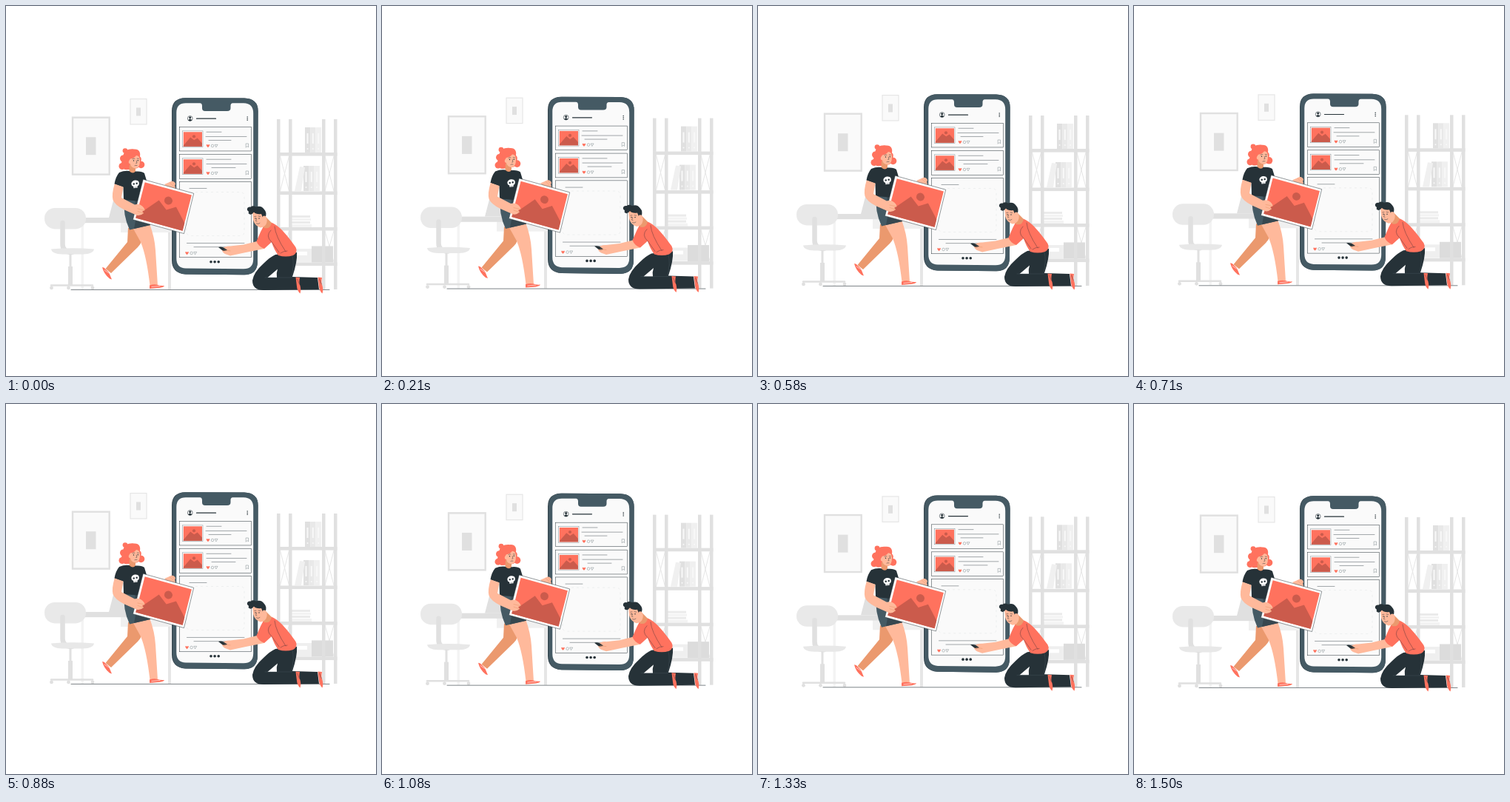
Animation, 500 px wide and 500 px high, one loop 1.54 s. Source, as an HTML page:

```html
<!DOCTYPE html>
<html lang="en">
<head>
<meta charset="utf-8">
<title>Posting a picture</title>
<style>
html, body { margin: 0; width: 100%; height: 100%; overflow: hidden; background: #fff; }
svg { display: block; width: 100vw; height: 100vh; }
</style>
</head>
<body>
<svg viewBox="0 0 500 500">
  <defs>
    <g id="photo">
      <rect width="1" height="1" fill="#ff725e"/>
      <path d="M0 .94L.374 .37L.57 .57L.75 .42L1 .78V1H0Z" fill="#cb5b4c"/>
      <ellipse cx=".564" cy=".312" rx=".084" ry=".108" fill="#cb5b4c"/>
    </g>
  </defs>
  <g id="scene"></g>
</svg>
<script>
const INK = '#263238', SLATE = '#455a64', CORAL = '#ff725e', SKIN = '#ffb99b', SHADE = '#eb996e';
const GREY = '#e0e0e0', PALE = '#ebebeb', FAINT = '#f3f3f3', SOFT = '#7d888d';

const path = (d, fill, extra = '') => `<path d="${d}" fill="${fill}" ${extra}/>`;
const line = (d, color = INK, w = 0.5) =>
  `<path d="${d}" fill="none" stroke="${color}" stroke-width="${w}" stroke-linecap="round" stroke-linejoin="round"/>`;
const rect = (x, y, w, h, fill, extra = '') =>
  `<rect x="${x}" y="${y}" width="${w}" height="${h}" fill="${fill}" ${extra}/>`;
const dot = (x, y, r, fill, extra = '') => `<circle cx="${x}" cy="${y}" r="${r}" fill="${fill}" ${extra}/>`;
const photo = m => `<use href="#photo" transform="matrix(${m})"/>`;
const outline = (color, w) => `stroke="${color}" stroke-width="${w}"`;

function wall() {
  return rect(90, 150.7, 49.7, 77, '#fafafa', outline(GREY, 2.4)) +
    rect(108, 177.3, 13.5, 24, GREY) +
    rect(168, 125.6, 22, 34.4, '#fafafa', outline('#e6e6e6', 1.2)) +
    rect(176, 137.5, 6, 11, GREY);
}

function desk() {
  return rect(101.5, 293, 3.5, 90, FAINT) + rect(219, 300, 4, 83, '#e6e6e6') +
    rect(155, 291, 67, 15, '#f0f0f0') + rect(105, 286, 118, 7.2, GREY) +
    path('M139 286L145 263Q145.500 261 148 261H171V286Z', GREY);
}

function chair() {
  return rect(52, 273, 56, 28.5, '#e9e9e9', 'rx="14"') +
    line('M76.500 293V322Q76.500 333 89 333', GREY, 6.5) +
    path('M61 328.500Q90 326 119 328.500Q118 335 104 335.500H76Q62 335 61 328.500Z', '#e8e8e8') +
    rect(85.5, 335, 3, 20, GREY) + rect(84, 352, 6, 25, GREY) +
    line('M61 377.500H117', GREY, 2.5) +
    [61.5, 84.5, 117].map(x => dot(x, 381, 2.4, GREY)).join('');
}

function books(x, y, h) {
  return [0, 1, 2].map(i =>
    rect(x + i * 7.3, y, 7.3, h, [GREY, '#e9e9e9', '#f0f0f0'][i]) +
    rect(x + i * 7.3 + 2.5, y + 8, 2, 14, '#f8f8f8') +
    dot(x + i * 7.3 + 3.5, y + h - 5, 1, '#f8f8f8')).join('');
}

function shelf() {
  const cross = (x, y, b) => line(`M${x} ${y}L${x + 12} ${b}M${x + 12} ${y}L${x} ${b}`, '#e6e6e6', 1);
  let s = '';
  for (const x of [370.5, 431]) s += cross(x, 203, 250) + cross(x, 304, 346);
  s += books(404, 164, 34) + books(402, 216, 34) +
    path('M390 250L397 217L404 218L399 250Z', '#f0f0f0');
  for (let i = 0; i < 3; i++) s += rect(383 + i % 2, 283 + i * 4, 28, 3, i === 1 ? FAINT : PALE);
  s += rect(383, 295, 30, 4, FAINT) + rect(387, 328, 27, 18, '#efefef') +
    rect(394, 332, 13, 5, '#fff') + rect(413, 324.5, 29, 22, '#dcdcdc');
  for (const x of [366, 382, 427, 443]) s += rect(x, 153, 4.5, 230, GREY);
  for (const y of [198, 250.5, 299, 346.5]) s += rect(366, y, 81.5, 4.6, GREY);
  return s;
}

function icons(x, y) {
  return path(`M${x} ${y + 2.2}C${x - 4} ${y - 1} ${x - 1.5} ${y - 3.2} ${x} ${y - 1}C${x + 1.5} ${y - 3.2} ${x + 4} ${y - 1} ${x} ${y + 2.2}Z`, CORAL) +
    dot(x + 6, y, 1.8, 'none', outline(SOFT, 0.5)) +
    line(`M${x + 9.5} ${y - 1.6}h3.600l-2 3.200z`, SOFT, 0.5);
}

function post(y, h, rows) {
  let s = rect(234.5, y, 97, h, 'none', outline(INK, 0.5)) +
    rect(238.6, y + 5.4, 27.4, 21.6, '#fff', outline(SOFT, 0.5)) +
    photo([25.2, 0, 0, 19.4, 239.8, y + 6.8]) +
    icons(273, y + 25.5) + line(`M324.500 ${y + 22.5}h3v5l-1.500 -1.500l-1.500 1.500z`, SOFT, 0.5);
  rows.forEach(([a, b], i) => s += line(`M${a} ${y + [6.8, 13, 18][i]}H${b}`, INK, 0.42));
  return s;
}

function phone() {
  const body = (x, fill) => path(`M${x + 18} 124.200L322 124.500Q340.600 125 340.600 142L340 345Q340 363 322 363.300L${x + 18} 362.500Q${x} 361 ${x} 343.500V142Q${x} 124.500 ${x + 18} 124.200Z`, fill);
  let s = body(224, '#37474f') + body(225, SLATE) +
    path('M243 131.200H262Q265 131.300 265 135V138Q265 142 269 142H299Q303.500 142 303.500 138V135Q303.500 131.400 306.500 131.400H321Q334.200 131.700 334.200 145V342Q334.200 355.300 321 355.300L243 354.600Q230.300 354 230.300 341V144Q230.300 131.300 243 131.200Z', '#fafafa');
  s += dot(248.7, 152, 3.4, '#fff', outline(INK, 0.6)) + dot(248.7, 150.8, 1.5, INK) +
    path('M246.200 154.500Q248.700 150.800 251.200 154.500Q248.700 156.500 246.200 154.500Z', INK) +
    line('M257.500 152.200H283.500', INK, 1.2);
  for (let i = 0; i < 3; i++) s += dot(326.2, 150 + i * 2.2, 0.75, INK) + dot(277 + i * 5.1, 345.8, 1.8, INK);
  s += post(163.5, 32.5, [[271, 291], [270, 325], [274, 304]]) +
    post(200.5, 32.8, [[271, 304], [271, 325], [278, 310]]);
  s += rect(234.5, 237.3, 97, 102.5, 'none', outline(INK, 0.5)) + line('M248 246.500H271', INK, 0.42) +
    rect(244, 251.5, 78, 59, 'none', 'rx="5" stroke="#dfe2e3" stroke-width=".5" stroke-dasharray="3 4"') +
    line('M244.500 320.500H322M254 325.700H321', INK, 0.42) + icons(244.6, 334);
  return s;
}

function woman() {
  let s = path('M165 300L187 298Q185 311 183 318Q182 322 178 326L142 361L134.500 355L164 319Z', SHADE) +
    path('M130 353Q133 353 135 356L139 360L143 369.500L140 368.500Q132 362 130 353Z', CORAL) +
    line('M133 357L139 361', '#fff', 0.6) +
    path('M172 301L194 294Q201 313 202 330L205 378H194.500Q190 338 182 319Z', SKIN) +
    path('M194 377.500Q200 375.500 205 377Q209 378.500 214 378Q213 380 208 380.800L194 382Z', CORAL) +
    line('M197 379.500L208 378.500', '#fff', 0.6);
  // shorts and top
  s += path('M160 261L187 262L195 296L167 302.500Q157.500 282 160 261Z', SLATE) +
    path('M174 262L187 262L195 296L173 301Q178 280 174 262Z', '#37474f') +
    path('M153 225Q160 222 167 223L176 223.500Q184 223 187 226L190 236L185 264L159 262L158.500 245L146.500 240.500Q148 231 153 225Z', INK);
  // skull print
  s += '<g transform="rotate(-6 174.500 241)">' +
    path('M169.500 240.500C169 234.500 180 234 180 239.500Q180 243 177.500 243.500L177 246H172L171.800 243.500Q169.500 243 169.500 240.500Z', '#fff') +
    dot(172.8, 240.3, 1.25, INK) + dot(176.8, 240, 1.25, INK) +
    line('M173.700 244.500V246M175.500 244.500V246', INK, 0.4) + '</g>';
  // head
  const curls = [[161, 195.6, 3.4], [158.500, 206, 4.5], [157, 216.500, 4.5], [163, 217, 4.2], [182.500, 214.500, 4.8], [179, 207, 3.8]];
  s += path('M158 204C159 195 166 192.500 173 193.500C180 193 182 198 181 203L183 212L178 219L168 221H160L156 212Z', CORAL) +
    curls.map(c => dot(...c, CORAL)).join('') +
    path('M167 214L175 216V223Q172 228 166.500 223Z', SHADE) +
    path('M168 206.500Q173 206 176 202Q181 202 181 209Q181 218 176 219.500Q169 219 168 213.500Q165 213 166 209.500Z', SKIN) +
    dot(172.5, 209, 0.75, INK) + dot(178.3, 208.7, 0.75, INK) +
    line('M171 206.800Q172.500 205.800 174 206.300M177.200 206.200L179.400 206.300M176.200 209L177 212.200L175.700 212.500M174 215.700Q175.500 215 177 215.500', INK, 0.5);
  // far hand, picture, near arm
  s += path('M214 241L221 238Q225 235.500 227.500 238Q230 240 228 242.500L229 246L222 248Z', SKIN) +
    line('M221 238.500L226 243M224 237.500L228 241.500', SHADE, 0.5) +
    path('M185.300 234.300L253.700 253.300L240.500 307.600L171.500 288.700Z', '#fff', outline(INK, 0.5)) +
    photo([63.3, 17.4, -12.3, 48.3, 187.6, 238.2]) +
    path('M146.700 240.500L158.500 244.500L156 259L174 268.500Q179 267 182 269Q187 272 187.500 276L184 277.500L186 280Q181 284.500 176 282.500L160 275.500Q147 269 144.500 262Q142.500 255 146.700 240.500Z', SKIN) +
    line('M178 274L187 276M178 277.500L185.500 280', SHADE, 0.6);
  return s;
}

function man() {
  let s = path('M364 336L393 333Q394 345 387 366L421 367L423 383L348 384Q333 384 333 371Q334.500 360 348 348Q357 339 364 336Z', INK) +
    path('M353.500 367L367 355.500Q365 361 366 367Z', '#fff') +
    line('M387 338Q390 348 386 367M350 367H386', '#48565d', 0.4);
  // feet
  const foot = x => path(`M${x} 366.500L${x + 5.5} 367Q${x + 4} 374 ${x + 6} 378Q${x + 7.5} 384 ${x + 6} 388.500Q${x + 2} 385 ${x + 1.5} 379Z`, CORAL) +
    line(`M${x + 2} 369L${x + 5} 376`, INK, 0.4);
  s += foot(391.5) + foot(421.5);
  // torso, arm
  s += path('M343 317L321 322.500L303 324.500Q296 324 292 328Q291 332 296 335L303 337.500L324 333L349 328Z', SKIN) +
    path('M287 326Q290 325 294 326.500L299 329.800Q296 332 292 330Z', INK) +
    line('M295 330L303 331', SHADE, 0.6) +
    path('M351 292C364 290 378 307 391.500 326Q395 333 388 337Q378 340 368 337Q362 329 359 319L349 328Q341 325 338.500 318Q344 304 351 292Z', CORAL) +
    line('M358 303Q350 311 359 319L369 333M363 298Q364 311 378 332M371 334Q375 331 380 331', '#8a4a45', 0.7);
  // head
  s += path('M341 292L351 285L359 293Q357 302 349 300Z', SHADE) +
    path('M333 278L347 279Q354 286 352.500 292Q351 299 344 299.500Q336 297 334 289Z', SKIN) +
    path('M326 276Q325 271 331 271.500Q333 269 338 271.500Q345 269 349 275Q353 279 350.500 286L347.500 287L345 281Q338 282 335 278.500Q331 284 327.500 280Q329 278 326 276Z', INK) +
    dot(349, 286, 2.4, SKIN) + dot(337, 287, 0.75, INK) + dot(342, 287, 0.75, INK) +
    line('M335.700 284.500L338 284.300M341 284L343.700 284.500M338.700 287L337.500 290.500L339 291M338.500 294Q341 295.500 343 293.500', INK, 0.5);
  return s;
}

const scene = document.getElementById('scene');
scene.innerHTML = wall() + desk() + chair() + shelf() + line('M88 383.500H437', INK, 0.6) +
  phone() + woman() + man();

const LOOP = 1540, STEPS = 37, LIFT = 5.7;

// The whole room floats softly up and back down, 24 steps a second.
function draw(ms) {
  const step = Math.floor((ms % LOOP) / LOOP * STEPS);
  const turn = 2 * Math.PI * (step + 1) / (STEPS - 1);
  const rise = LIFT * (1 - Math.cos(turn)) / 2;
  scene.setAttribute('transform', `translate(0 ${-rise.toFixed(3)})`);
}

const start = performance.now();
function tick() {
  draw(performance.now() - start);
  requestAnimationFrame(tick);
}
tick();
</script>
</body>
</html>
```
